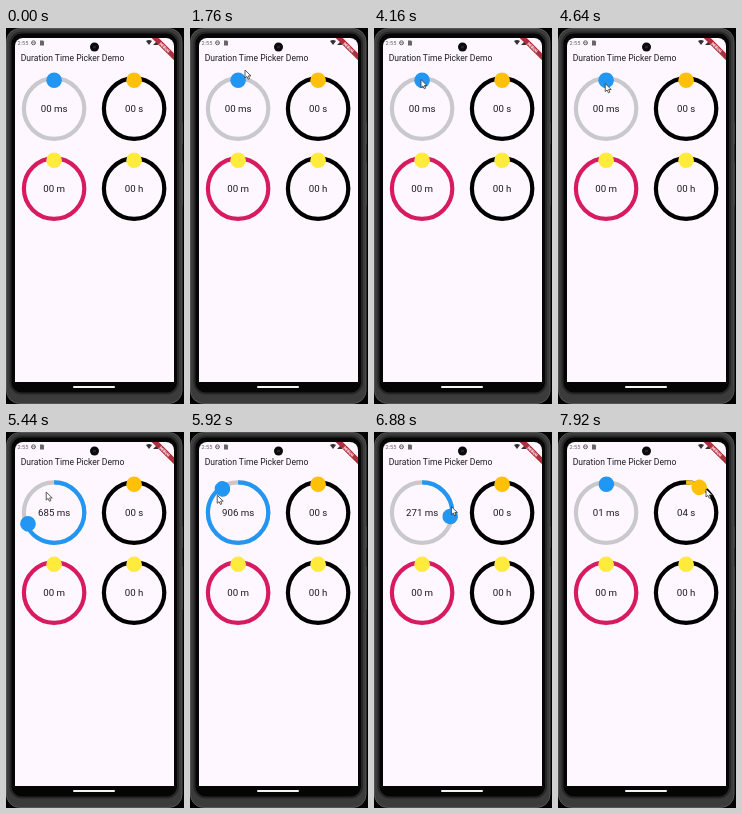
Write an HTML page that moves like this. It is 178x376 px and loops after 8000 ms.

```html
<!DOCTYPE html>
<html lang="en">
<head>
<meta charset="utf-8">
<title>Duration Time Picker Demo</title>
<style>
  html, body { margin: 0; width: 100%; height: 100%; overflow: hidden; background: #000; }
  svg { display: block; width: 100vw; height: 100vh; }
  text { font-family: Roboto, sans-serif; fill: #1d1b20; }
  .value { font-size: 9.7px; text-anchor: middle; }
</style>
</head>
<body>
<svg viewBox="0 0 178 376">
  <!-- phone body -->
  <rect x="174" y="94" width="3" height="22" rx="1" fill="#2a2a2a"/>
  <rect x="174" y="134" width="3" height="44" rx="1" fill="#2a2a2a"/>
  <rect x=".5" y=".5" width="175.5" height="375" rx="13" fill="#3b3b3b" stroke="#555"/>
  <rect x="4.5" y="4.5" width="167.5" height="361" rx="11" fill="#050505" stroke="#262626" stroke-width="2"/>
  <clipPath id="screen"><path d="M9 354V18a8 8 0 0 1 8-8H160a8 8 0 0 1 8 8V354z"/></clipPath>
  <g clip-path="url(#screen)">
    <rect x="9" y="10" width="159" height="344" fill="#fef7ff"/>
    <g fill="#666">
      <text x="11.5" y="17" font-size="5.6" style="fill:#666">2:55</text>
      <circle cx="27.5" cy="14.8" r="2" fill="none" stroke="#666"/>
      <path d="M25.5 14.8h4" stroke="#666" stroke-width=".8"/>
      <path d="M34 12.5h3l1 1v4h-4z"/>
      <path d="M140 13q3-2 6 0l-3 4z" fill="#333"/>
      <path d="M152 12v5h-5z" fill="#333"/>
    </g>
    <g transform="translate(168 10) rotate(45)">
      <rect x="-22" y="10.8" width="44" height="5" fill="#b02f3c"/>
      <text y="14.8" font-size="4" font-weight="900" text-anchor="middle" style="fill:#fff">DEBUG</text>
    </g>
    <text x="14.7" y="33" font-size="8.56">Duration Time Picker Demo</text>
    <g id="pickers"></g>
  </g>
  <circle cx="88.5" cy="19" r="4.5" fill="#0a0a0a"/>
  <circle cx="88.5" cy="19" r="1.6" fill="#25252d"/>
  <rect x="67" y="358" width="42" height="2" rx="1" fill="#f4f4f4"/>
  <path id="cursor" d="M0 0V8L1.9 6.4L3.2 9.2L4.6 8.6L3.4 5.9H6z" fill="#fff" stroke="#333" stroke-width=".8" stroke-linejoin="round"/>
</svg>
<script>
const LOOP = 8000, STEP = 80;
const CENTER = { x: 48.1, y: 80.6 }, PITCH = 80;
const DRAG = { start: 4640, peak: 5760, end: 7200 };

const progress = (t, from, to) => Math.min(1, Math.max(0, (t - from) / (to - from)));
const mix = (a, b, k) => a + (b - a) * k;

// Dial up evenly, then wind back with growing speed
function millis(t) {
  const up = 960 * progress(t, DRAG.start, DRAG.peak);
  return mix(up, 1.5, progress(t, DRAG.peak, DRAG.end) ** 1.317);
}
const seconds = t => 4.6 * progress(t, 7680, 7920);
const zero = () => 0;

// Free pointer moves: time, x, y
const moves = [
  [1760, 55, 42], [2080, 57, 45], [2480, 72, 248], [2960, 58, 92], [3520, 47, 47],
  [4640, 47, 55], [7200, 50, 54], [7360, 143, 57], [7600, 134, 58], [7920, 148, 57]
];
// Pointer while dragging the first dial: time, clockwise degrees, radius
const orbit = [
  [4640, -2, 25], [5440, 339, 22], [5760, 350, 24], [6320, 209, 35], [7200, 4, 27]
];

function sample(rows, t) {
  const i = rows.findIndex(row => row[0] > t);
  if (i < 1) return rows[i ? rows.length - 1 : 0].slice(1);
  const [a, b] = [rows[i - 1], rows[i]];
  const k = progress(t, a[0], b[0]);
  return [mix(a[1], b[1], k), mix(a[2], b[2], k)];
}

function pointer(t) {
  if (t < DRAG.start || t > DRAG.end) return sample(moves, t);
  const [degrees, radius] = sample(orbit, t);
  const angle = degrees * Math.PI / 180;
  return [CENTER.x + radius * Math.sin(angle), CENTER.y - radius * Math.cos(angle)];
}

const pickers = [
  { unit: "ms", max: 1000, base: "#c9c8cd", color: "#2196f3", valueAt: millis },
  { unit: "s", max: 60, base: "#000", color: "#ffc107", valueAt: seconds },
  { unit: "m", max: 60, base: "#d81b60", color: "#ffeb3b", valueAt: zero },
  { unit: "h", max: 24, base: "#000", color: "#ffeb3b", valueAt: zero }
];

function add(parent, tag, attrs) {
  const el = document.createElementNS("http://www.w3.org/2000/svg", tag);
  for (const key in attrs) el.setAttribute(key, attrs[key]);
  return parent.appendChild(el);
}

const layer = document.getElementById("pickers");
pickers.forEach((p, i) => {
  const x = CENTER.x + PITCH * (i % 2), y = CENTER.y + PITCH * Math.floor(i / 2);
  const g = add(layer, "g", { transform: `translate(${x} ${y})` });
  const ring = { r: 30.2, fill: "none", "stroke-width": 4.2 };
  add(g, "circle", { ...ring, stroke: p.base });
  p.arc = add(g, "circle", { ...ring, stroke: p.color, pathLength: 1, transform: "rotate(-90)" });
  p.knob = add(g, "circle", { cy: -28.4, r: 7.8, fill: p.color });
  p.label = add(g, "text", { class: "value", y: 3.6 });
});

function show(p, value) {
  const turn = value / p.max;
  p.arc.setAttribute("visibility", turn > 0 ? "visible" : "hidden");
  p.arc.setAttribute("stroke-dasharray", `${turn} 2`);
  p.knob.setAttribute("transform", `rotate(${turn * 360})`);
  p.label.textContent = `${String(Math.floor(value)).padStart(2, "0")} ${p.unit}`;
}

const cursor = document.getElementById("cursor");
function draw(now) {
  const t = Math.floor((now % LOOP) / STEP) * STEP;
  for (const p of pickers) show(p, p.valueAt(t));
  cursor.setAttribute("visibility", t < moves[0][0] ? "hidden" : "visible");
  cursor.setAttribute("transform", `translate(${pointer(t).join(" ")})`);
}

const start = performance.now();
function tick() {
  draw(performance.now() - start);
  requestAnimationFrame(tick);
}
tick();
</script>
</body>
</html>
```
